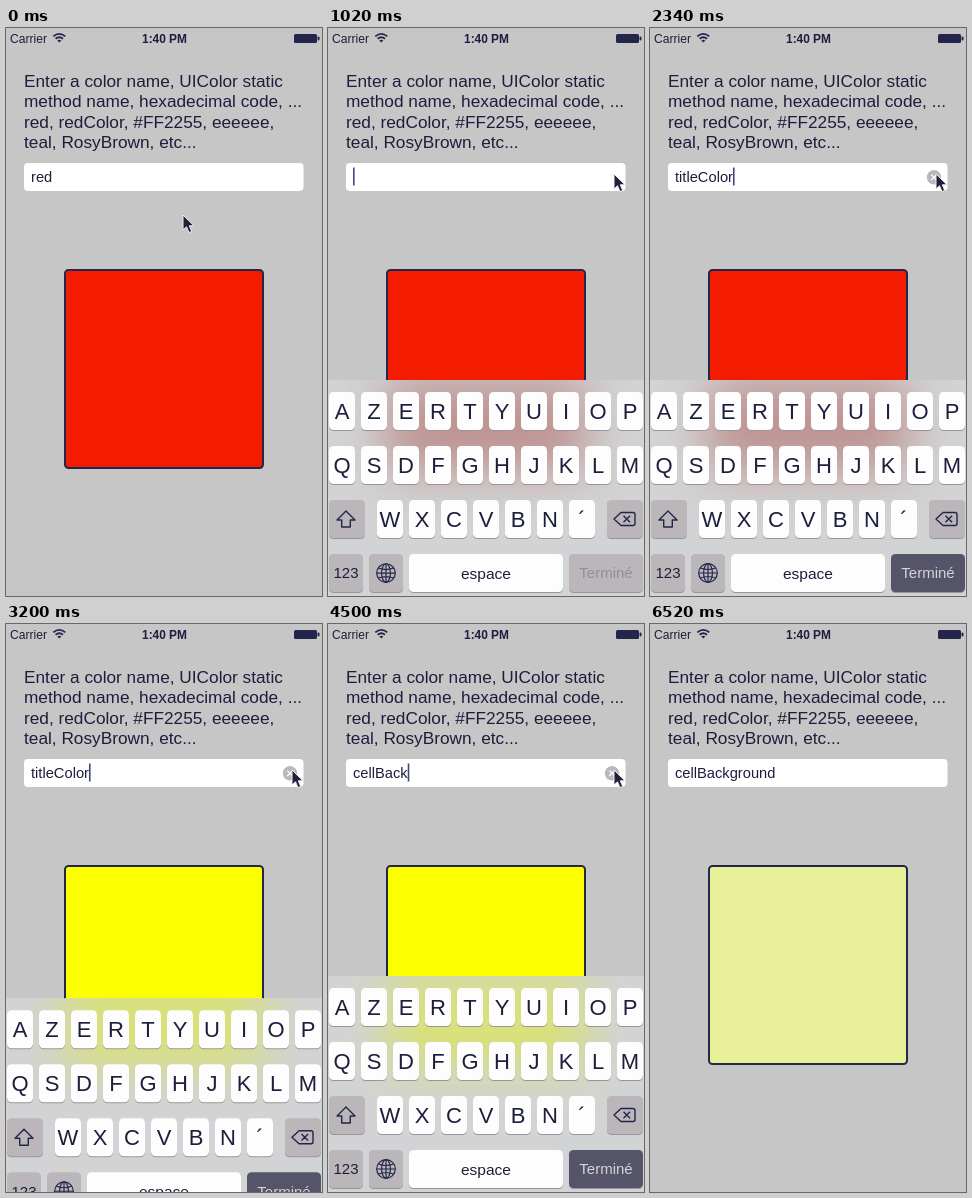
Animation of 316 by 568 pixels, one loop 6.54 s. Source, as an HTML page:

```html
<!DOCTYPE html>
<html lang="en">
<head>
<meta charset="utf-8">
<title>Color names</title>
<style>
html, body { margin: 0; width: 100%; height: 100%; overflow: hidden; background: #c6c6c6; }
svg { display: block; width: 316px; height: 568px; }
text { font-family: "Liberation Sans", Arial, sans-serif; fill: #1c1e3c; white-space: pre; }
.mid { text-anchor: middle; }
.line { fill: none; stroke: #23264a; stroke-width: 1.4; }
</style>
</head>
<body>
<svg viewBox="0 0 316 568">
  <defs>
    <clipPath id="panel"><rect y="352" width="316" height="216"/></clipPath>
    <filter id="blur" x="-50%" y="-100%" width="200%" height="300%"><feGaussianBlur stdDeviation="24"/></filter>
  </defs>
  <rect width="316" height="568" fill="#c6c6c6"/>

  <!-- status bar -->
  <text x="4" y="14.5" font-size="12.1">Carrier</text>
  <path class="line" d="M47.3 8.4Q53.3 3.4 59.3 8.4M49.6 10.8Q53.3 7.7 57 10.8" style="stroke-width:1.8"/>
  <path d="M51.3 12.4Q53.3 10.9 55.3 12.4L53.3 14.6Z" fill="#23264a"/>
  <text class="mid" x="158.5" y="14.5" font-size="11.9" font-weight="bold">1:40 PM</text>
  <rect x="288" y="6" width="23" height="9" rx="1.5" fill="#23264a"/>
  <rect x="311.5" y="8.5" width="2" height="4" rx="1" fill="#23264a"/>

  <g font-size="17.25">
    <text x="18" y="59">Enter a color name, UIColor static</text>
    <text x="18" y="79.3">method name, hexadecimal code, ...</text>
    <text x="18" y="99.6">red, redColor, #FF2255, eeeeee,</text>
    <text x="18" y="119.9">teal, RosyBrown, etc...</text>
  </g>

  <!-- text field -->
  <rect x="18" y="135" width="279.5" height="28" rx="4" fill="#fff"/>
  <text id="entry" x="25" y="154" font-size="14.7"></text>
  <rect id="caret" y="139.5" width="1.6" height="18" fill="#3f477a"/>
  <g id="clear">
    <circle cx="284" cy="149.3" r="7.2" fill="#b9b9bd"/>
    <path d="M281.3 146.6l5.4 5.4m0-5.4l-5.4 5.4" stroke="#fff" stroke-width="1.3"/>
  </g>

  <rect id="swatch" x="59" y="242" width="198" height="198" rx="3.5" stroke="#23284a" stroke-width="2"/>

  <g id="keyboard">
    <rect y="352" width="316" height="216" fill="#d2d3d4"/>
    <g clip-path="url(#panel)">
      <rect id="tint" x="58" y="352" width="200" height="92" filter="url(#blur)"/>
    </g>
    <g id="keys"></g>
    <path class="line" d="M18 483L27 492H22.3V499H13.7V492H9Z" stroke-linejoin="round"/>
    <path class="line" d="M293 484.5H305Q307 484.5 307 486.5V495.5Q307 497.5 305 497.5H293L286 491Z M295.5 487.7l6.6 6.6m0-6.6l-6.6 6.6" stroke-linejoin="round"/>
    <g class="line" style="stroke-width:1.2">
      <circle cx="58" cy="545" r="9.3"/>
      <ellipse cx="58" cy="545" rx="4.4" ry="9.3"/>
      <path d="M58 535.7V554.3M48.7 545H67.3M50.5 540Q58 543 65.5 540M50.5 550Q58 547 65.5 550"/>
    </g>
  </g>

  <path id="pointer" d="M0 0V15L3.5 11.8L6 17.6L8.7 16.4L6.3 10.8H11Z" fill="#20223c" stroke="#f0f0f0" stroke-width="1"/>
</svg>
<script>
const LOOP = 6540;
const $ = id => document.getElementById(id);
const clamp = v => Math.max(0, Math.min(1, v));

// Keys
const FUNC = '#bab6ba';
function key(x, y, w, label = '', size = 22, fill = '#fdfdfd', id = '') {
  const baseline = y + 19 + size * .355;
  return `<rect x="${x}" y="${y + 1}" width="${w}" height="38" rx="4.5" fill="#98949a"/>
    <rect id="${id}Key" x="${x}" y="${y}" width="${w}" height="38" rx="4.5" fill="${fill}"/>
    <text id="${id}Label" class="mid" x="${x + w / 2}" y="${baseline}" font-size="${size}">${label}</text>`;
}
const row = (letters, x, y) => [...letters].map((c, i) => key(x + 32 * i, y, 26, c)).join('');
$('keys').innerHTML =
  row('AZERTYUIOP', 1, 364) + row('QSDFGHJKLM', 1, 418) + row('WXCVBN´', 49, 472) +
  key(1, 472, 36, '', 15, FUNC) + key(279, 472, 36, '', 15, FUNC) +
  key(1, 526, 34, '123', 15, FUNC) + key(41, 526, 34, '', 15, FUNC) +
  key(81, 526, 154, 'espace', 15.5) + key(241, 526, 74, 'Terminé', 15, FUNC, 'done');

// Timeline in ms: each session opens the keyboard, clears, types and submits
const sessions = [
  { open: 420, clear: 820, type: 1100, close: 2480, before: 'red', word: 'titleColor' },
  { open: 2990, clear: 3420, type: 3600, close: 5480, before: 'titleColor', word: 'cellBackground' }
];
const KEY_STEP = 120;
const swatches = [
  { fill: '#f41c00', tint: '#b06a68', alpha: .6 },
  { fill: '#fcff00', tint: '#d9e465', alpha: .85 },
  { fill: '#e8f09a', tint: '#dfe7a6', alpha: .85 }
];

// Critically damped spring, 0 to 1
function spring(ms) {
  const x = Math.max(0, ms) * .01826;
  return 1 - (1 + x) * Math.exp(-x);
}

function entryAt(t, s) {
  if (t < s.clear) return s.before;
  return s.word.slice(0, Math.max(0, Math.floor((t - s.type) / KEY_STEP) + 1));
}

function show(el, on) { el.style.display = on ? '' : 'none'; }

function draw(t) {
  const s = sessions[t < sessions[1].open ? 0 : 1];
  const text = entryAt(t, s);
  const focused = t >= s.open && t < s.close;
  const shown = spring(t - s.open) - spring(t - s.close);
  const drop = 216 * (1 - shown);

  $('entry').textContent = text;
  $('caret').setAttribute('x', 25 + (text ? $('entry').getComputedTextLength() : 0));
  show($('caret'), focused);
  show($('clear'), focused && text);

  const c = swatches[sessions.filter(q => t >= q.close).length];
  $('swatch').setAttribute('fill', c.fill);
  $('tint').setAttribute('fill', c.tint);
  $('tint').setAttribute('opacity', c.alpha);
  $('tint').setAttribute('transform', `translate(0 ${-drop})`);
  $('keyboard').setAttribute('transform', `translate(0 ${drop})`);
  show($('keyboard'), drop < 215.5);

  $('doneKey').setAttribute('fill', text ? '#555468' : FUNC);
  $('doneLabel').style.fill = text ? '#d4d4da' : '#919096';

  const p = clamp((t - 60) / 320), e = p * p * (3 - 2 * p);
  $('pointer').setAttribute('transform', `translate(${177 + 109 * e} ${187 - 41 * e})`);
  show($('pointer'), t < 6000);
}

const start = performance.now();
function frame() {
  draw((performance.now() - start) % LOOP);
  requestAnimationFrame(frame);
}
frame();
</script>
</body>
</html>
```
